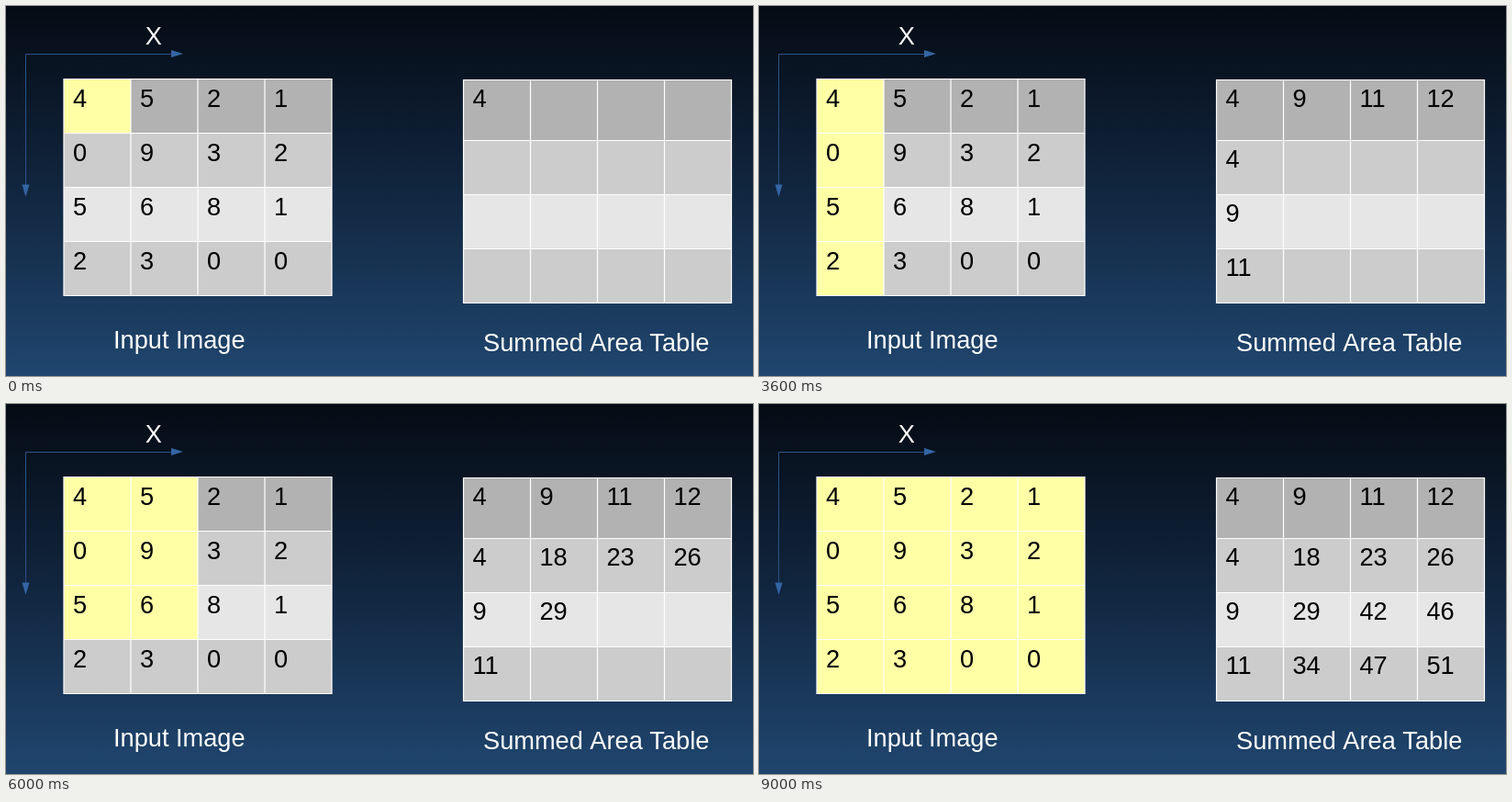
Write an HTML page with a canvas that moves like this. It is 814 by 403 pixels and loops after 9.6 s.

```html
<!DOCTYPE html>
<html lang="en">
<head>
<meta charset="utf-8">
<title>Summed Area Table</title>
<style>
html, body { margin: 0; width: 100%; height: 100%; overflow: hidden; background: #050b14; }
canvas { display: block; }
</style>
</head>
<body>
<canvas id="stage" width="814" height="403"></canvas>
<script>
const ctx = document.getElementById('stage').getContext('2d');
const STEP = 600;
const CELL = 73;
const YELLOW = '#ffffa6';
const ROW_COLORS = ['#b2b2b2', '#cccccc', '#e6e6e6', '#cccccc'];
const input = [[4, 5, 2, 1], [0, 9, 3, 2], [5, 6, 8, 1], [2, 3, 0, 0]];

// Inclusive 2D prefix sums
const sums = input.map((row, r) => row.map((_, c) =>
  input.slice(0, r + 1).flatMap(line => line.slice(0, c + 1)).reduce((a, b) => a + b)));

// Visiting order: top row, left column, then the remaining rows
const order = [];
for (let c = 0; c < 4; c++) order.push([0, c]);
for (let r = 1; r < 4; r++) order.push([r, 0]);
for (let r = 1; r < 4; r++) for (let c = 1; c < 4; c++) order.push([r, c]);

const left = { x: 63, ys: [79.5, 138.5, 197.5, 256.5, 315.5], base: 30.5 };
const right = { x: 498.5, ys: [80.5, 146.5, 205.5, 264.5, 323.5], base: 29.5 };

const sky = ctx.createLinearGradient(0, 0, 0, 403);
sky.addColorStop(0, '#050b14');
sky.addColorStop(0.5, '#11263f');
sky.addColorStop(1, '#20466f');

function label(text, x, y, color = '#fff') {
  ctx.fillStyle = color;
  ctx.fillText(text, x, y);
}

function path(points) {
  ctx.beginPath();
  points.forEach(([x, y]) => ctx.lineTo(x, y));
}

function drawAxes() {
  ctx.strokeStyle = '#2b5488';
  ctx.lineWidth = 1;
  path([[21.5, 196], [21.5, 52.5], [181, 52.5]]);
  ctx.stroke();
  ctx.fillStyle = '#3465a4';
  path([[180, 48], [193, 52], [180, 56]]);
  ctx.fill();
  path([[17.5, 194.5], [21.5, 208], [25.5, 194.5]]);
  ctx.fill();
}

function drawTable({ x, ys, base }, fillOf, textOf) {
  for (let r = 0; r < 4; r++) {
    for (let c = 0; c < 4; c++) {
      ctx.fillStyle = fillOf(r, c);
      ctx.fillRect(x + c * CELL, ys[r], CELL, ys[r + 1] - ys[r]);
    }
  }
  ctx.strokeStyle = '#fff';
  ctx.lineWidth = 1.2;
  ctx.beginPath();
  for (let i = 0; i < 5; i++) {
    const gx = x + i * CELL;
    ctx.moveTo(gx, ys[0] - 0.5);
    ctx.lineTo(gx, ys[4] + 0.5);
    ctx.moveTo(x - 0.5, ys[i]);
    ctx.lineTo(x + 4 * CELL + 0.5, ys[i]);
  }
  ctx.stroke();
  for (let r = 0; r < 4; r++) {
    for (let c = 0; c < 4; c++) {
      label(textOf(r, c), x + c * CELL + 10, ys[r] + base, '#000');
    }
  }
}

function draw(step) {
  const [row, col] = order[step];
  const done = order.slice(0, step + 1);
  const filled = (r, c) => done.some(([dr, dc]) => dr === r && dc === c);

  ctx.fillStyle = sky;
  ctx.fillRect(0, 0, 814, 403);
  ctx.font = '27.2px "Liberation Sans", Arial, sans-serif';
  drawAxes();
  drawTable(left, (r, c) => r <= row && c <= col ? YELLOW : ROW_COLORS[r], (r, c) => input[r][c]);
  drawTable(right, r => ROW_COLORS[r], (r, c) => filled(r, c) ? sums[r][c] : '');
  label('X', 151.8, 42);
  label('Input Image', 117, 373);
  label('Summed Area Table', 520, 375.5);
}

let shown = -1;
const start = performance.now();
function tick() {
  const step = Math.floor((performance.now() - start) / STEP) % order.length;
  if (step !== shown) draw(shown = step);
  requestAnimationFrame(tick);
}
tick();
</script>
</body>
</html>
```
